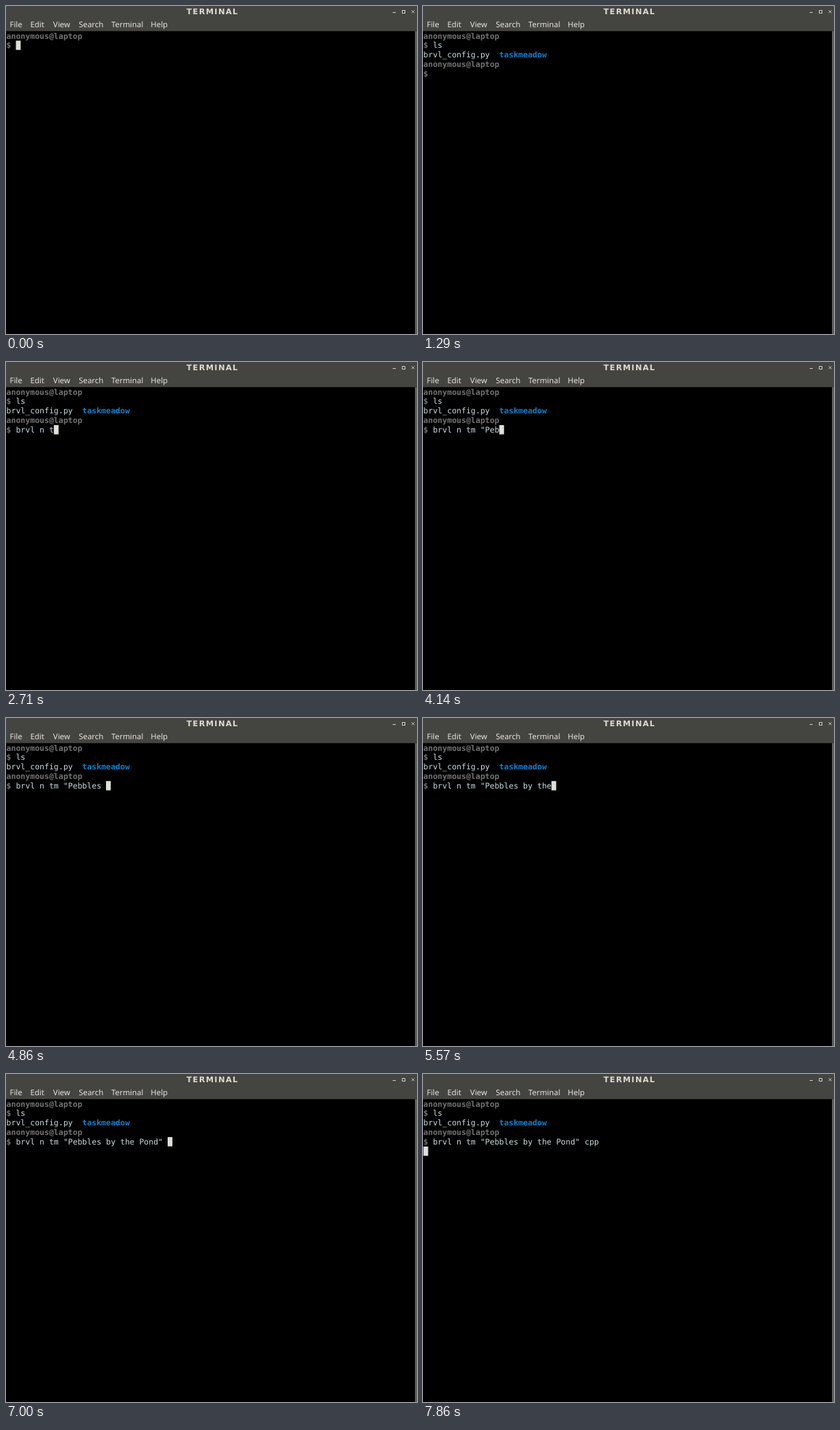
An HTML page for the animation above (8 s loop, 600x479 px).

```html
<!DOCTYPE html>
<html lang="en">
<head>
<meta charset="utf-8">
<title>Terminal</title>
<style>
  html, body { margin: 0; width: 100%; height: 100%; overflow: hidden; background: #000; }
  svg { display: block; width: 100vw; height: 100vh; }
  text { white-space: pre; text-rendering: geometricPrecision; }
  .title { font: bold 11.4px "DejaVu Sans", sans-serif; letter-spacing: 1.3px; fill: #dfdbd2; }
  .menu { font: 11.4px "Noto Sans", "Open Sans", sans-serif; fill: #e6e3dc; }
  .buttons { fill: none; stroke: #d5d2ca; stroke-width: 1; }
  #screen { font: 11.5px "DejaVu Sans Mono", monospace; fill: #c9dcdf; }
  #screen .prompt { font-weight: bold; fill: #737373; }
  #screen .folder { font-weight: bold; fill: #0f80cb; }
</style>
</head>
<body>
<svg viewBox="0 0 600 479" preserveAspectRatio="none">
  <rect width="600" height="479" fill="#000"/>
  <rect width="600" height="36.7" fill="#444440"/>
  <rect x="597" y="36.7" width="3" height="443" fill="#5e5e5b"/>
  <text class="title" x="263.5" y="12.4">TERMINAL</text>
  <g class="buttons">
    <path d="M564.5 9.5h4.5M592.3 6.3l4 4m0-4l-4 4"/>
    <rect x="578.5" y="6.5" width="4" height="4"/>
  </g>
  <g class="menu" id="menu"></g>
  <g id="screen"></g>
  <rect id="cursor" fill="#dfdfd8"/>
</svg>
<script>
const LOOP = 8000, TICKS_PER_MS = 7 / 1000;
const CELL_W = 6.923, CELL_H = 13.83, LEFT = 0.6, TOP = 36.8, ASCENT = 10.8;

const LIST = 'ls';
const COMMAND = 'brvl n tm "Pebbles by the Pond" cpp';
// Tick at which each character of the command is typed.
const KEY_TICKS = [
  11, 12, 13, 13, 14, 16, 17, 19, 21, 21, 23,
  26, 28, 29, 30, 31, 32, 33, 34, 35, 36, 37, 38, 39, 39, 40,
  42, 43, 44, 45, 48, 49, 51, 52, 53
];
const LIST_START = 3, LIST_ENTER = 5, BLINK_OFF = 9, COMMAND_ENTER = 55;

const byId = id => document.getElementById(id);
const screen = byId('screen'), cursor = byId('cursor');

function addText(parent, x, y, content, className = '') {
  const node = document.createElementNS('http://www.w3.org/2000/svg', 'text');
  node.setAttribute('x', x);
  node.setAttribute('y', y);
  node.setAttribute('class', className);
  node.textContent = content;
  return parent.appendChild(node);
}

const cellX = col => LEFT + col * CELL_W;
const rowY = row => TOP + row * CELL_H;
const print = (col, row, content, className) =>
  addText(screen, cellX(col), rowY(row) + ASCENT, content, className);

function addPrompt(row) {
  return [print(0, row, 'anonymous@laptop', 'prompt'), print(0, row + 1, '$', 'prompt')];
}

const menu = [['File', 5.5], ['Edit', 35.5], ['View', 68.8], ['Search', 106.3], ['Terminal', 153.8], ['Help', 211.3]];
menu.forEach(([label, x]) => addText(byId('menu'), x, 30.8, label));

addPrompt(0);
const listInput = print(2, 1, '');
const output = [
  print(0, 2, 'brvl_config.py'),
  print(16, 2, 'taskmeadow', 'folder'),
  ...addPrompt(3)
];
const commandInput = print(2, 4, '');

cursor.setAttribute('width', CELL_W);
cursor.setAttribute('height', CELL_H - 0.3);

function render(time) {
  const tick = Math.floor((time + 5) * TICKS_PER_MS);
  const listed = tick >= LIST_ENTER;
  const listCount = Math.min(LIST.length, Math.max(0, tick - LIST_START + 1));
  const keyCount = KEY_TICKS.filter(key => key <= tick).length;

  listInput.textContent = LIST.slice(0, listCount);
  commandInput.textContent = COMMAND.slice(0, keyCount);
  output.forEach(node => node.setAttribute('visibility', listed ? 'visible' : 'hidden'));

  let col = 2 + (listed ? keyCount : listCount), row = listed ? 4 : 1;
  if (tick >= COMMAND_ENTER) [col, row] = [0, 5];
  const blinkedOff = tick >= BLINK_OFF && tick < KEY_TICKS[0];
  cursor.setAttribute('x', cellX(col));
  cursor.setAttribute('y', rowY(row));
  cursor.setAttribute('visibility', blinkedOff ? 'hidden' : 'visible');
}

const start = performance.now();
function loop() {
  render((performance.now() - start) % LOOP);
  requestAnimationFrame(loop);
}
loop();
</script>
</body>
</html>
```
